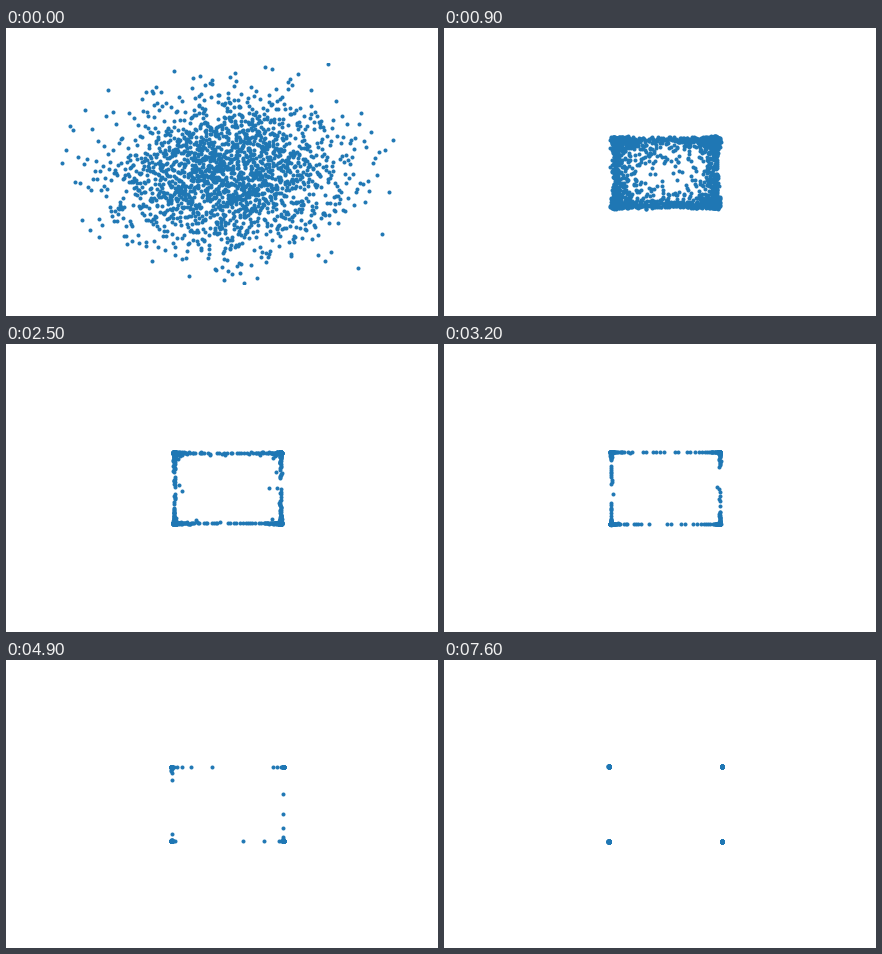
Recreate the animation shown at these times as a matplotlib script. Size 432 by 288 pixels, loop 7.7 s.

```python
import numpy as np
import matplotlib.pyplot as plt
from matplotlib.animation import FuncAnimation

W, H, DPI = 432, 288, 72
FRAMES, INTERVAL = 77, 100
COUNT = 2000
RATE = 0.125    # growth per frame away from the middle

rng = np.random.default_rng(7)


def normal_quantiles(count):
    """Evenly spread, symmetric samples of a standard normal."""
    z = np.linspace(-4, 4, 8001)
    cdf = np.cumsum(np.exp(-z**2 / 2))
    q = np.interp((np.arange(count) + 0.5) / count, cdf / cdf[-1], z)
    return (q - q[::-1]) / 2


def flow(p, n):
    """Solution of p' = p - p^3 after n frames: each axis settles at -1 or 1."""
    g = np.exp(RATE * n)
    return p * g / np.sqrt(1 + p**2 * (g * g - 1))


quantiles = normal_quantiles(COUNT)
start = np.column_stack([rng.permutation(quantiles) for _ in range(2)])
jitter = rng.normal(size=start.shape)


def positions(n):
    p = flow(start, n)
    ramp = 1 - np.exp(-n / 3)
    # the square shrinks a little, then slowly regains its size
    size = 1.02 - 0.22 * np.exp(-n / 20) * (1 - np.exp(-n / 4))
    rise = np.array([0, 0.04 * (1 - np.exp(-n / 8))])
    # sides bow inwards early on
    bow = 0.06 * np.exp(-n / 10) * ramp
    bend = 1 - bow * np.clip(1 - p[:, ::-1]**2, 0, 1)
    noise = (0.075 * np.exp(-n / 9) + 0.002) * ramp
    return p * bend * size + rise + noise * jitter


fig = plt.figure(figsize=(W / DPI, H / DPI), dpi=DPI, facecolor="white")
ax = fig.add_axes([0.125, 0.11, 0.775, 0.77])
ax.set(xlim=(-3, 3), ylim=(-3, 3))
ax.axis("off")
dots, = ax.plot([], [], ".", color="#1f77b4", markersize=6)


def update(n):
    dots.set_data(*positions(n).T)
    return dots,


anim = FuncAnimation(fig, update, frames=FRAMES, interval=INTERVAL,
                     repeat=True, repeat_delay=0)
plt.show()
```
